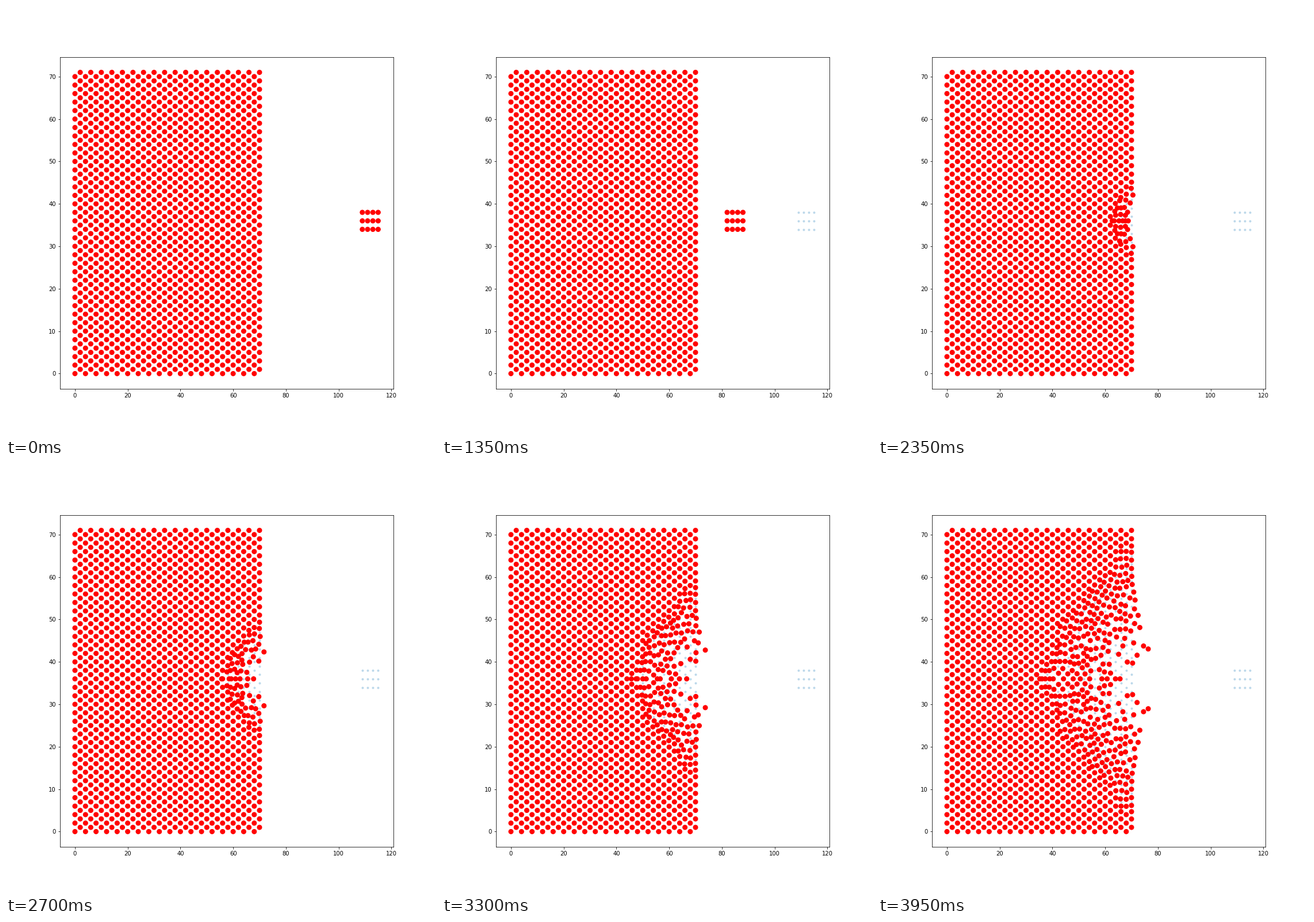
A matplotlib script that plays this animation: 748 by 748 pixels, repeating every 4 s.

```python
import numpy as np
import matplotlib.pyplot as plt
from matplotlib.animation import FuncAnimation

FRAMES = 80
SUBSTEPS = 8
REACH = 2.0       # discs repel each other below this distance
STIFFNESS = 0.21
SCALE = 748.6 / 748


def grid(xs, ys):
    return np.array([(x, y) for x in xs for y in ys], float)


def initial_state():
    wall = np.vstack([grid(range(0, 71, 4), range(0, 71, 2)),
                      grid(range(2, 71, 4), range(1, 72, 2))])
    bullet = grid(range(109, 116, 2), range(34, 39, 2))
    pos = np.vstack([wall, bullet])
    vel = np.zeros_like(pos)
    vel[len(wall):, 0] = -1
    return pos, vel


def close_pairs(pos, limit=4.4):
    dx = pos[:, None, 0] - pos[None, :, 0]
    dy = pos[:, None, 1] - pos[None, :, 1]
    return np.nonzero(np.triu(dx * dx + dy * dy < limit * limit, 1))


def acceleration(pos, i, j):
    """Hertzian contact: the push grows with overlap ** 1.5."""
    d = pos[i] - pos[j]
    r = np.maximum(np.hypot(d[:, 0], d[:, 1]), 0.02)
    hit = r < REACH
    i, j, d, r = i[hit], j[hit], d[hit], r[hit]
    push = d * (STIFFNESS * (REACH - r) ** 1.5 / r)[:, None]
    acc = np.zeros_like(pos)
    np.add.at(acc, i, push)
    np.add.at(acc, j, -push)
    return acc


def simulate():
    pos, vel = initial_state()
    dt = 1 / SUBSTEPS
    path = [pos.copy()]
    for _ in range(FRAMES - 1):
        i, j = close_pairs(pos)
        for _ in range(SUBSTEPS):
            vel += acceleration(pos, i, j) * dt
            pos += vel * dt
        path.append(pos.copy())
    return path


path = simulate()
start = path[0]

fig, ax = plt.subplots(figsize=(10.3889, 10.3889), dpi=72)
fig.subplots_adjust(left=0.125 * SCALE, right=0.9 * SCALE,
                    bottom=0.11 * SCALE, top=0.88 * SCALE)
ax.set_xlim(-5.75, 120.75)
ax.set_ylim(-3.55, 74.55)
ax.plot(start[:, 0], start[:, 1], 'o', color='#bcd8ea', ms=3, zorder=1.5)
# one colour per disc keeps the markers off the pixel grid
discs = ax.scatter(start[:, 0], start[:, 1], s=64, c=['red'] * len(start),
                   linewidths=1, zorder=2)


def update(n):
    discs.set_offsets(path[n])
    return discs,


anim = FuncAnimation(fig, update, frames=FRAMES, interval=50, repeat=True)
plt.show()
```
